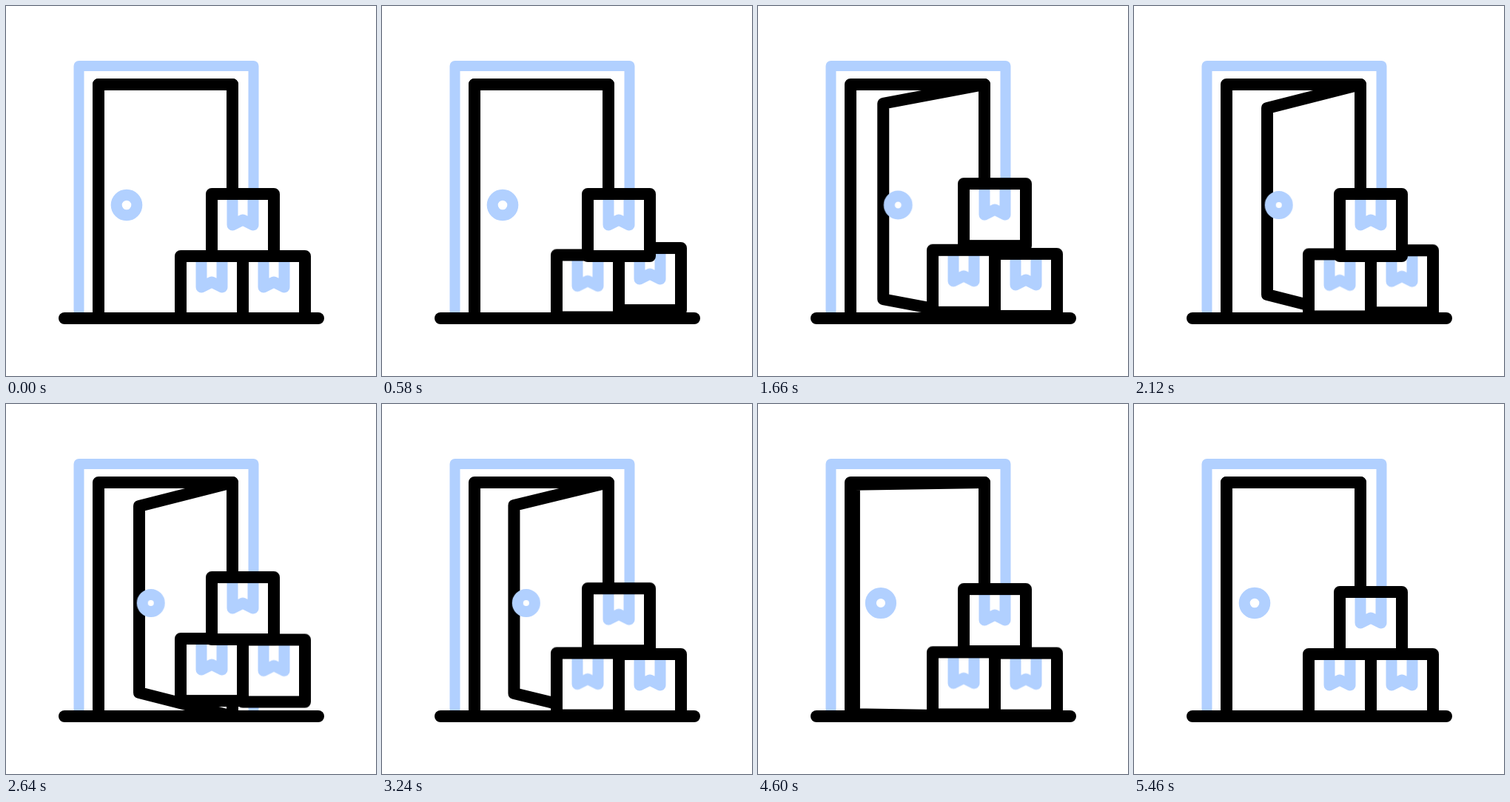
An HTML page without scripts that plays this animation: 500x500 px, repeating every 5680 ms.

```html
<!DOCTYPE html>
<html lang="en">
<head>
<meta charset="utf-8">
<title>Door and parcels</title>
<style>
  :root {
    --loop: 5680ms;
    --swing: cubic-bezier(.37, 0, .63, 1);
  }
  html, body { margin: 0; width: 100%; height: 100%; overflow: hidden; background: #fff; }
  svg { display: block; width: 100%; height: 100%; }

  .ink, .tint { fill: none; stroke-linecap: round; stroke-linejoin: round; }
  .ink { stroke: #000; stroke-width: 16; }
  .tint { stroke: #b1d0ff; stroke-width: 15; }
  .frame { stroke-width: 14; }
  .face { fill: #fff; }

  .door { animation: door var(--loop) var(--swing) infinite; }
  .knob { animation: knob var(--loop) var(--swing) infinite; }
  .box { animation: hop var(--loop) linear var(--lag, 0ms) infinite backwards; }

  @keyframes door {
    0%, 12.46%, 87.7%, 100% { d: path("M306 106L125 106L125 422L306 422"); }
    36.2%, 53.3% { d: path("M306 106L180 138L180 390L306 422"); }
  }
  @keyframes knob {
    0%, 12.46%, 87.7%, 100% { r: 13.8px; transform: none; }
    36.2%, 53.3% { r: 11.5px; transform: translateX(32.7px); }
  }
  /* Three hops under gravity, each lower than the last */
  @keyframes hop {
    0%, 30.14%, 56.29%, 82.75%, 100% { transform: translateY(0); }
    8.49%, 35.16%, 61.6% {
      transform: translateY(0);
      animation-timing-function: cubic-bezier(.333, .667, .667, 1);
    }
    19.31%, 45.72%, 72.1% { animation-timing-function: cubic-bezier(.333, 0, .667, .333); }
    19.31% { transform: translateY(-37px); }
    45.72% { transform: translateY(-21px); }
    72.1% { transform: translateY(-8.5px); }
  }
</style>
</head>
<body>
<svg viewBox="0 0 500 500">
  <defs>
    <g id="parcel">
      <path class="face" d="M0 0H84V84H0Z"/>
      <path class="tint" d="M28 0V42L42 35L56 42V0"/>
      <path class="ink" d="M0 0H84V84H0Z"/>
    </g>
  </defs>

  <path class="tint frame" d="M98.5 416V81H334.5V416"/>
  <path class="ink" d="M125 422V106H306V422"/>
  <path class="ink door" d="M306 106L125 106L125 422L306 422"/>
  <circle class="tint knob" cx="163" cy="269" r="13.8"/>
  <path class="ink" d="M79 422H422"/>

  <g class="box"><use href="#parcel" x="320" y="338"/></g>
  <g class="box" style="--lag: 86ms"><use href="#parcel" x="236" y="338"/></g>
  <g class="box" style="--lag: 180ms"><use href="#parcel" x="278" y="254"/></g>
</svg>
</body>
</html>
```
